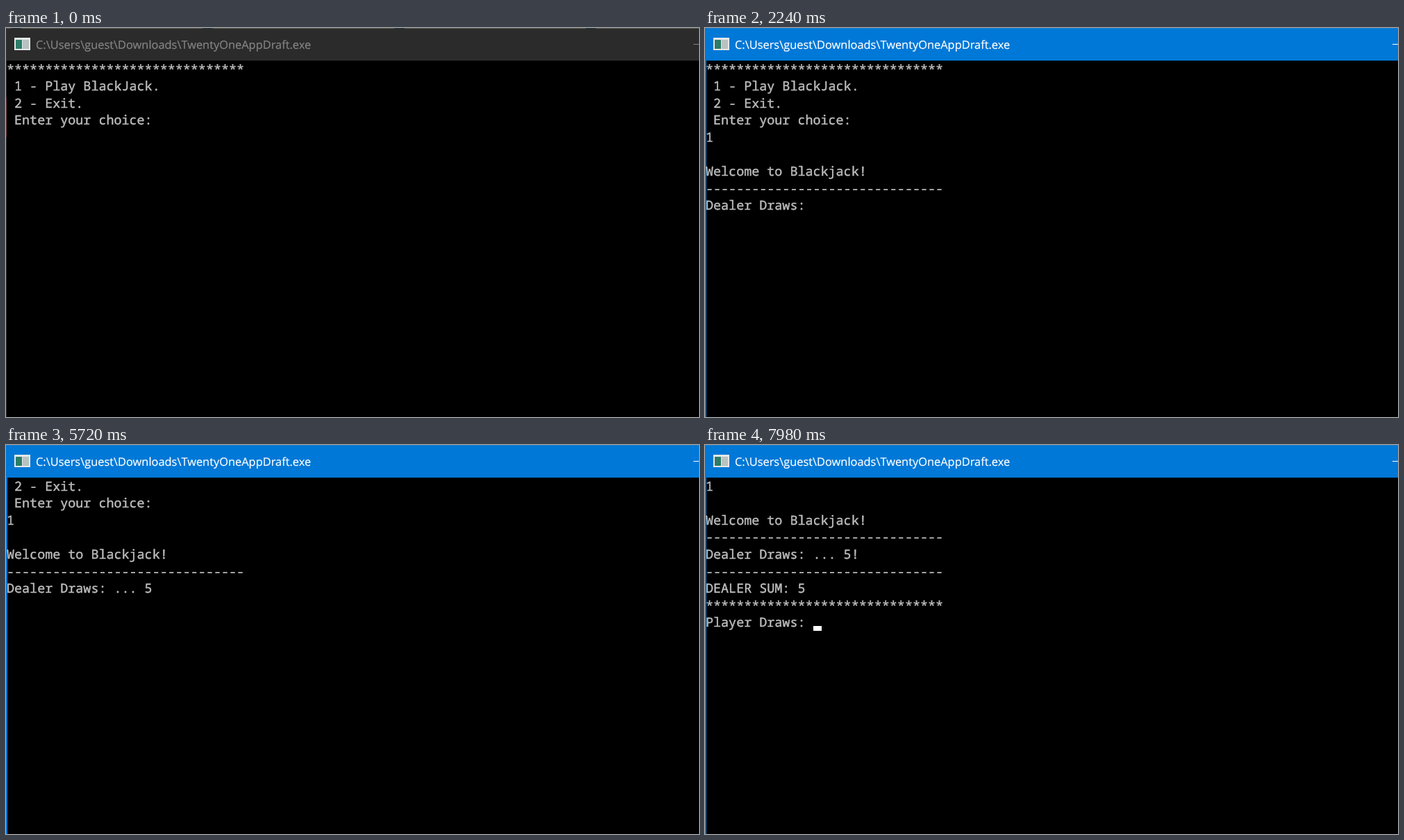
These frames come from a looping animation (998 by 561 pixels, 8000 ms). An HTML page:

```html
<!DOCTYPE html>
<html lang="en">
<head>
<meta charset="utf-8">
<title>Console card game</title>
<style>
  html, body { margin: 0; width: 100%; height: 100%; overflow: hidden; background: #000; }
  body { position: relative; text-rendering: geometricPrecision; }
  div, pre { position: absolute; margin: 0; }
  #edge { left: 0; top: 0; width: 2px; height: 100%; background: #0078d7; }
  #bar {
    left: 0; top: 0; width: 100%; height: 47px;
    background: #0078d7; color: #fff;
    font: 16.4px/47px "Open Sans", sans-serif; white-space: pre;
    -webkit-text-stroke: 0.2px;
  }
  #rim { left: 0; top: 0; width: 100%; height: 1px; background: #1a7fc9; }
  #path { left: 43px; top: 0; }
  #icon {
    left: 12px; top: 14px; width: 23px; height: 18px; box-sizing: border-box;
    border: 2px solid #e4e8e8; border-top-width: 3px;
    background: linear-gradient(90deg, #2c7d68 0 45%, #e4e8e8 45% 55%, #b9c2c2 55%);
  }
  #minimize { right: 0; top: 23px; width: 8px; height: 1px; background: currentColor; }
  #screen {
    left: 1px; top: 47.8px; color: #bcbcbc;
    font: 18.4px/24.55px "Noto Sans Mono", monospace;
    -webkit-text-stroke: 0.45px;
  }
  #cursor { width: 12px; height: 7px; background: #fff; }
  .inactive #bar { background: #2b2b2b; color: #858585; }
  .inactive #rim {
    background: repeating-linear-gradient(90deg, #5a5e52 0 7px, #24383c 7px 22px, #5a5e52 22px 276px);
  }
  .inactive #edge {
    width: 1px;
    background: linear-gradient(#303030 100px, #6b3a42 100px 158px, #303030 158px);
  }
</style>
</head>
<body>
<div id="bar">
  <div id="rim"></div>
  <div id="icon"></div>
  <div id="path">C:\Users\guest\Downloads\TwentyOneAppDraft.exe</div>
  <div id="minimize"></div>
</div>
<div id="edge"></div>
<pre id="screen"></pre>
<div id="cursor"></div>
<script>
const LOOP = 8000, FOCUS_AT = 420;
const CELL = 11.04, ROW = 24.55, LEFT = 1, CURSOR_TOP = 64.5;
const BLINK = 900, BLINK_ON = 475;

const stars = "*".repeat(31), dashes = "-".repeat(31);

// Console output: time, text appended, lines scrolled off the top so far
const output = [
  [0, `${stars}\n 1 - Play BlackJack.\n 2 - Exit.\n Enter your choice:\n`, 0],
  [1160, "1", 0],
  [2060, `\n\nWelcome to Blackjack!\n${dashes}\nDealer Draws: `, 0],
  [2980, ".", 0],
  [3880, ".", 0],
  [4440, "", 2],
  [4840, ".", 2],
  [5700, " 5", 2],
  [6260, "!", 2],
  [6400, "", 3],
  [6520, `\n${dashes}\nDEALER SUM: 5\n${stars}\nPlayer Draws: `, 4]
];

const screen = document.getElementById("screen");
const cursor = document.getElementById("cursor");

function draw(now) {
  const t = now % LOOP;
  const shown = output.filter(([time]) => time <= t);
  const scroll = shown[shown.length - 1][2];
  const lines = shown.map(([, text]) => text).join("").split("\n").slice(scroll);
  const text = lines.join("\n");
  if (screen.textContent !== text) screen.textContent = text;

  const focused = t >= FOCUS_AT;
  document.body.classList.toggle("inactive", !focused);

  const phase = (t - BLINK_ON + BLINK) % BLINK;
  const row = lines.length - 1;
  cursor.hidden = !focused || phase >= BLINK / 2;
  cursor.style.left = Math.round(LEFT + lines[row].length * CELL) + "px";
  cursor.style.top = Math.round(CURSOR_TOP + row * ROW) + "px";
}

function tick() {
  draw(performance.now());
  requestAnimationFrame(tick);
}
tick();
</script>
</body>
</html>
```
